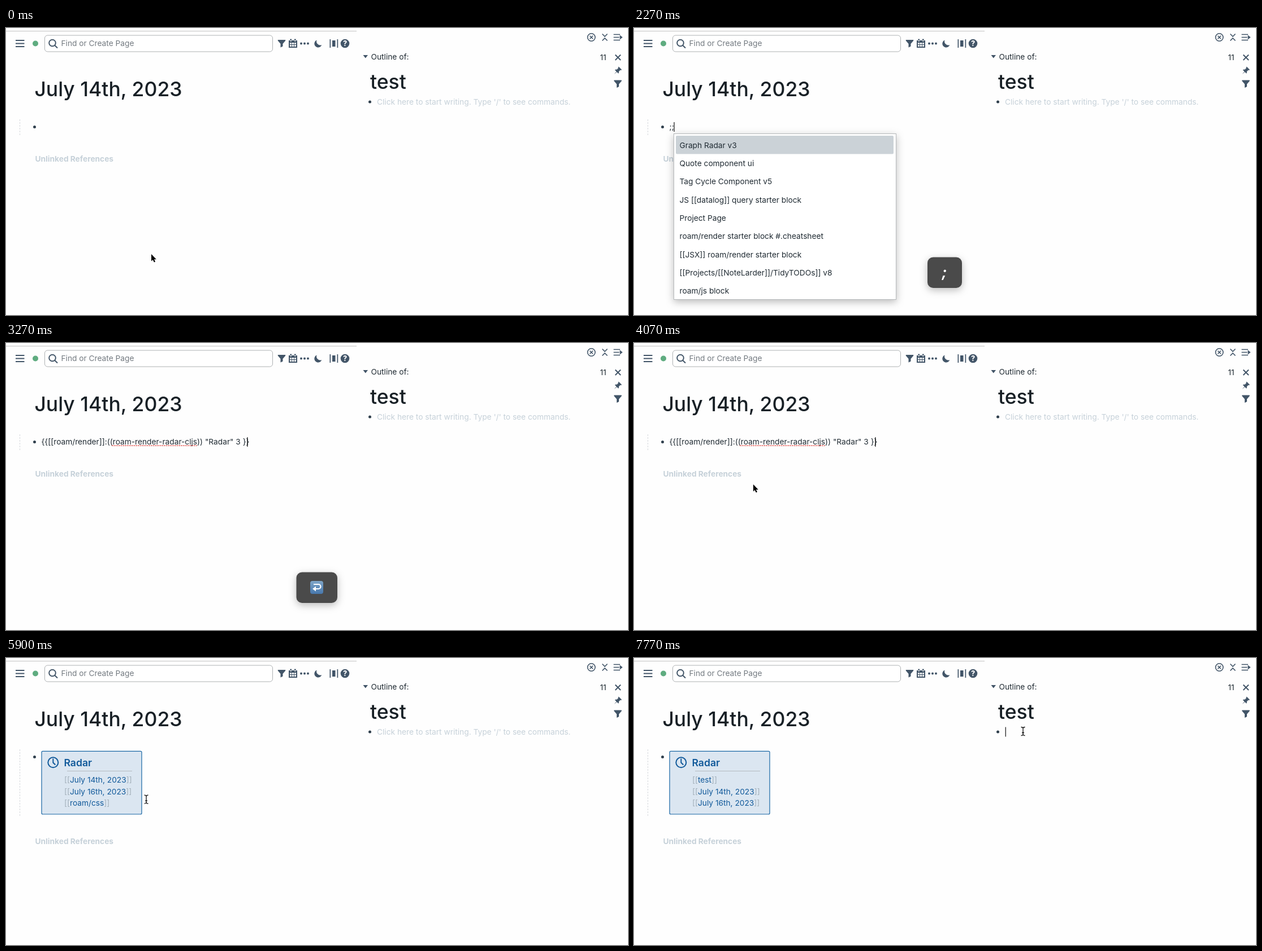
Animation of 1100x509 px, one loop 8000 ms. Source, as an HTML page:

```html
<!DOCTYPE html>
<html lang="en">
<head>
<meta charset="utf-8">
<title>Radar block</title>
<style>
  html, body { margin: 0; width: 100%; height: 100%; overflow: hidden; background: #fefefe; }
  svg { display: block; width: 1100px; height: 509px; }
  text { font: 13.72px Inter, sans-serif; font-optical-sizing: none; fill: #202b33; white-space: pre; }
  .title { font-size: 35.5px; font-weight: 500; fill: #182026; }
  .faint { fill: #c6d1d9; }
  .line { fill: none; stroke: #425568; stroke-width: 1.6; }
  .thick { stroke-width: 2; }
  .icon { fill: #425568; }
  .dot { fill: #30404d; }
  .link { fill: #10599a; }
  .link tspan { fill: #a3b0ba; }
  .panel { filter: drop-shadow(0 4px 7px #0004); }
</style>
</head>
<body>
<svg viewBox="0 0 1100 509">
  <defs>
    <path id="funnel" d="M-6.5-6.5h13q.8.8 0 1.8L2 .5V5L-2 7V.5L-6.5-4.7q-.8-1 0-1.8z"/>
    <linearGradient id="blue" x2="0" y2="1">
      <stop stop-color="#7fa6c9"/><stop offset="1" stop-color="#4777ac"/>
    </linearGradient>
  </defs>

  <!-- toolbar -->
  <path d="M0 5.5H620" stroke="#c3c3c3"/>
  <path class="line thick" d="M17 22H32.5M17 27.5H32.5M17 33H32.5"/>
  <circle cx="52" cy="27.5" r="5" fill="#5fac80"/>
  <rect x="68.5" y="13" width="403" height="29" rx="5" fill="#fff" stroke="#aeb1b3"/>
  <path class="line thick" d="M86.200 30.700L91 35.500M87.800 26.500a5.800 5.800 0 1 0-11.600 0a5.800 5.800 0 1 0 11.600 0"/>
  <text x="97.5" y="32.3" style="fill:#737a80">Find or Create Page</text>
  <g class="icon">
    <use href="#funnel" x="487.5" y="27.5"/>
    <path fill-rule="evenodd" d="M500 22h15v13h-15zM502 26v3h3v-3zm4 0v3h3v-3zm4 0v3h3v-3zm-8 4v3h3v-3zm4 0v3h3v-3zm4 0v3h3v-3zM502.5 19.5h2.5v4h-2.5zm7.5 0h2.5v4h-2.5z"/>
    <circle cx="522" cy="27.5" r="2"/><circle cx="528" cy="27.5" r="2"/><circle cx="534" cy="27.5" r="2"/>
    <path d="M549.5 21.5a6.700 6.700 0 1 0 8.800 8.600 6.800 6.800 0 0 1-8.800-8.600z"/>
    <path d="M572.5 20h1.700v15h-1.700zm4.500 2h5.500v11h-5.500zm8.500-2h1.700v15h-1.700z"/>
    <circle cx="599.5" cy="27.5" r="7.8"/>
  </g>
  <text x="599.5" y="32" text-anchor="middle" style="fill:#fff;font-weight:800;font-size:12.5px">?</text>

  <!-- sidebar -->
  <g class="line">
    <circle cx="1035.2" cy="16.5" r="6.7"/>
    <path d="M1032.4 13.700l5.600 5.600m0-5.600l-5.600 5.600M1054.5 10.500l4.500 4.500 4.500-4.500M1054.5 22.500l4.500-4.500 4.500 4.500"/>
    <path d="M1074.5 11.500h11.500M1074.5 16.500h10M1074.5 21.500h11.500"/>
    <path class="thick" d="M1077.5 47.500l9.500 9.500m0-9.500l-9.500 9.500"/>
  </g>
  <g class="icon">
    <path d="M1085.5 12.500l5 4-5 4z"/>
    <path d="M631.5 48h8.500l-4.250 5.500z"/>
    <path d="M1083.5 68.500l5.500 5.500-1.500 1-1-.4-2.700 2.700q.5 2.200-.8 3.500l-2.800-2.800-4.700 4 4-4.700-2.800-2.800q1.300-1.300 3.500-.8l2.700-2.700-.4-1z"/>
    <use href="#funnel" x="1082" y="99"/>
  </g>
  <text x="645.5" y="55.5">Outline of:</text>
  <text x="1050.5" y="56.7">11</text>
  <text x="644" y="108" class="title">test</text>
  <circle class="dot" cx="643.5" cy="131" r="2.5"/>
  <text id="hint" x="656" y="136" class="faint">Click here to start writing. Type '/' to see commands.</text>

  <!-- page -->
  <text x="50.4" y="120.5" class="title">July 14th, 2023</text>
  <path id="guide" stroke="#d5d9dc" stroke-dasharray="3 2"/>
  <circle class="dot" cx="50.5" cy="175.5" r="2.5"/>
  <text id="unlinked" x="51.5" class="faint" style="font-weight:700">Unlinked References</text>
  <text id="typed" x="62.5" y="180"></text>
  <path id="spelling" d="M188 182H337" stroke="#e0443e" stroke-width="2" stroke-linecap="round" stroke-dasharray="0 3.3"/>

  <g id="card">
    <rect x="63" y="165.3" width="177" height="111.7" rx="2" fill="#dbe6f1" stroke="#1765a3" stroke-width="1.2"/>
    <g fill="none" stroke="#10599a" stroke-width="2"><circle cx="83.3" cy="185.3" r="9"/><path d="M83.3 178.5v7l4 4"/></g>
    <text x="102.5" y="191.7" class="link" style="font-size:17.57px;font-weight:600">Radar</text>
    <path d="M108 200.5H223" stroke="#b4bac0"/>
    <g id="links"></g>
  </g>

  <g id="menu">
    <rect class="panel" x="70.5" y="187.5" width="393" height="294" fill="#fff" stroke="#b5b8ba"/>
    <rect x="74" y="191" width="385" height="32.5" rx="2" fill="#cbd2d7"/>
  </g>

  <g id="semicolonKey">
    <rect class="panel" x="519" y="406.5" width="61" height="54.5" rx="10" fill="#4a4a4a"/>
    <text x="549" y="442" text-anchor="middle" style="font-size:26px;font-weight:700;font-style:italic;fill:#fff">;</text>
  </g>
  <g id="enterKey">
    <rect class="panel" x="513.5" y="406.5" width="72.5" height="54.5" rx="10" fill="#4a4a4a"/>
    <rect x="538" y="422" width="23" height="23" rx="4" fill="url(#blue)"/>
    <path d="M544 428h8.500a4 4 0 0 1 0 8h-6" fill="none" stroke="#fff" stroke-width="2.2"/>
    <path d="M548 431.5v9l-6-4.500z" fill="#fff"/>
  </g>

  <rect id="caret" width="1.2" height="17" fill="#111"/>
  <path id="arrow" d="M0 0V12.500L2.800 10L4.900 14.500L7 13.500L5 9.200H8.800z" stroke="#fff" paint-order="stroke"/>
  <path id="beam" d="M-3.5-7.5Q0-7.5 0-5Q0-7.5 3.5-7.5M0-5V5M-3.5 7.5Q0 7.5 0 5Q0 7.5 3.5 7.5M-2 2.5H2" fill="none" stroke="#111" stroke-width="1.3"/>
</svg>
<script>
const LOOP = 8000;
const $ = id => document.getElementById(id);
const show = (id, alpha) => $(id).setAttribute("opacity", Number(alpha));
const move = (id, x, y) => $(id).setAttribute("transform", `translate(${x} ${y})`);
const ramp = (t, start, end) => Math.max(0, Math.min(1, (t - start) / (end - start)));

const menuItems = ["Graph Radar v3", "Quote component ui", "Tag Cycle Component v5",
  "JS [[datalog]] query starter block", "Project Page", "roam/render starter block #.cheatsheet",
  "[[JSX]] roam/render starter block", "[[Projects/[[NoteLarder]]/TidyTODOs]] v8", "roam/js block"];
$("menu").insertAdjacentHTML("beforeend", menuItems.map((item, i) =>
  `<text x="80.5" y="${212.5 + i * 32.35}">${item}</text>`).join(""));

const pages = ["test", "July 14th, 2023", "July 16th, 2023", "roam/css"];
const linkRows = from => pages.slice(from, from + 3).map((page, i) =>
  `<text class="link" x="103" y="${221 + i * 20.7}"><tspan>[[</tspan>${page}<tspan>]]</tspan></text>`).join("");

// Block text over time: start, text, caret x, caret y (no caret position hides it)
const edits = [
  [0, ""],
  [770, "", 62.6, 167],
  [2000, ";", 66.6, 167],
  [2200, ";;", 70.4, 167],
  [2780, '{{[[roam/render]]:((roam-render-radar-cljs)) "Radar" 3 }}', 426.3, 167],
  [4380, ""],
  [7500, "", 656.6, 122.5]
];

// Pointer path: time, x, y
const path = [[0, 257, 401], [50, 257, 401], [720, 158, 167], [3850, 158, 167], [4330, 278, 357],
  [4550, 278, 357], [5130, 282, 265], [5430, 277, 266], [6270, 228, 240], [6630, 184, 206],
  [6700, 184, 206], [7380, 688, 130], [LOOP, 688, 130]];

function pointerAt(t) {
  const i = path.findIndex(p => p[0] > t);
  const [a, b] = [path[i - 1], path[i]];
  const u = ramp(t, a[0], b[0]), k = u * u * (3 - 2 * u);
  return [a[1] + (b[1] - a[1]) * k, a[2] + (b[2] - a[2]) * k];
}

let shownFrom = -1;
function draw(t) {
  const rendered = t >= 4380;
  const [since, text, caretX, caretY] = edits.findLast(e => e[0] <= t);
  $("typed").textContent = text;
  show("caret", caretX !== undefined && (t - since) % 1000 < 500);
  move("caret", caretX ?? 0, caretY ?? 0);
  show("spelling", t >= 2780 && !rendered);
  show("menu", t >= 2200 && t < 2780);
  show("semicolonKey", t < 2780 ? ramp(t, 2000, 2100) : 0);
  show("enterKey", t >= 2780 ? 1 - ramp(t, 3550, 3750) : 0);

  show("card", rendered);
  $("guide").setAttribute("d", `M24.5 162V${rendered ? 281 : 190}`);
  $("unlinked").setAttribute("y", rendered ? 329.5 : 237.3);
  const from = t < 7600 ? 1 : 0;
  if (from !== shownFrom) $("links").innerHTML = linkRows(shownFrom = from);
  show("hint", t < 7500);

  const [x, y] = pointerAt(t);
  const isArrow = t < 4400 || y > 282;
  const visible = t < 2000 || t >= 3850;
  show("arrow", visible && isArrow);
  show("beam", visible && !isArrow);
  move("arrow", x, y);
  move("beam", x, y);
}

const start = performance.now();
function tick() {
  draw((performance.now() - start) % LOOP);
  requestAnimationFrame(tick);
}
tick();
</script>
</body>
</html>
```
